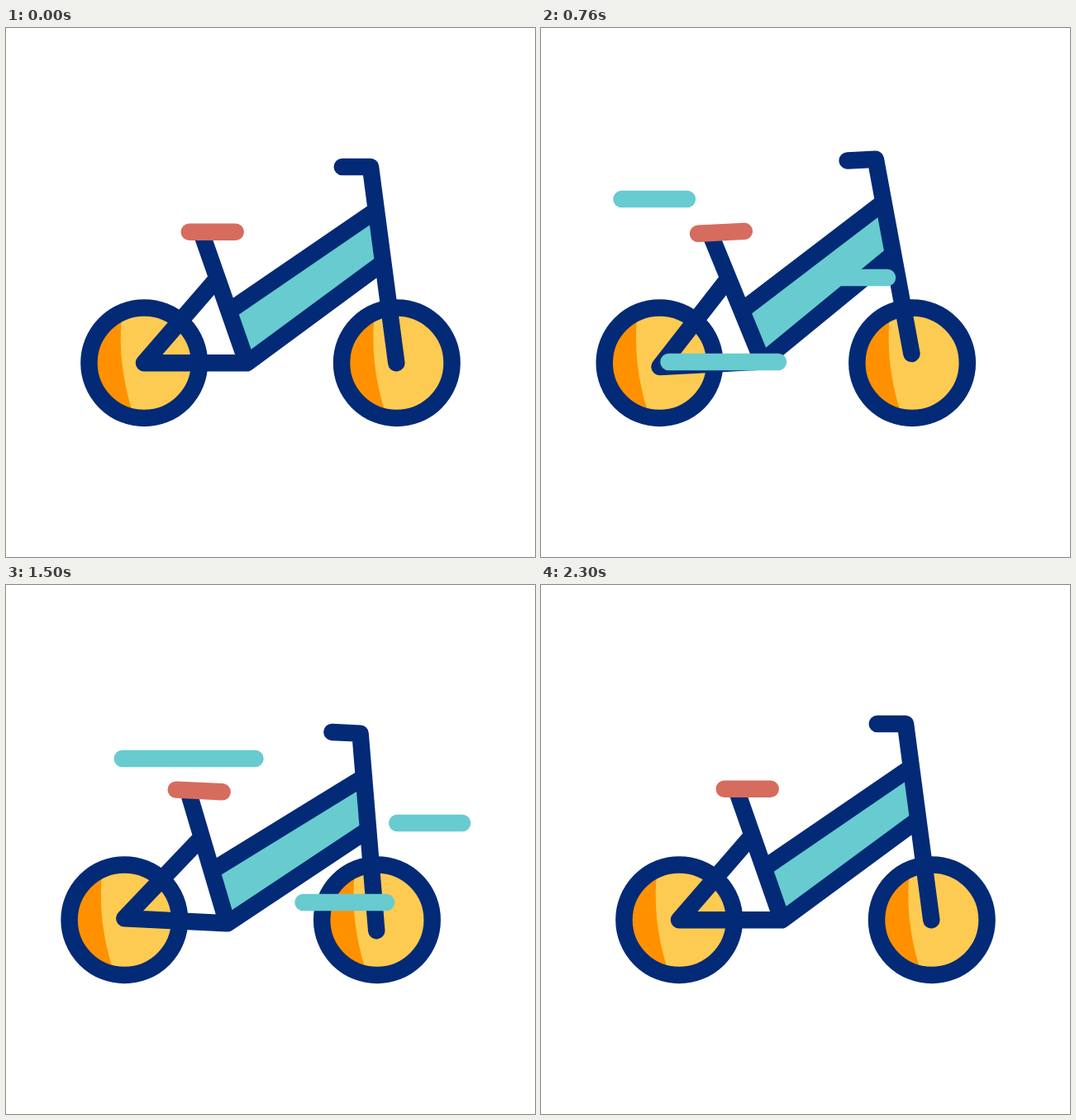
An HTML page for the animation above (2.42 s loop, 640 by 640 pixels).

```html
<!DOCTYPE html>
<html lang="en">
<head>
<meta charset="utf-8">
<title>Bicycle</title>
<style>
  html, body { margin: 0; width: 100%; height: 100%; overflow: hidden; background: #fff; }
  svg { display: block; width: 100%; height: 100%; }
  .line { fill: none; stroke-width: 20.5; stroke-linecap: round; stroke-linejoin: round; }
  .navy { stroke: #032a76; }
  .red { stroke: #d66c5e; }
  .teal { stroke: #67cbd0; }
</style>
</head>
<body>
<svg viewBox="0 0 640 640">
  <defs>
    <g id="wheel">
      <circle r="62" fill="#fdcb51"/>
      <path d="M-27.1-58Q-32.9 0-14.6 58A60 60 0 0 1-27.1-58Z" fill="#ff9100"/>
      <circle class="line navy" r="66.75"/>
    </g>
  </defs>
  <g id="wheels">
    <use href="#wheel" x="167.2" y="405.2"/>
    <use href="#wheel" x="472.8" y="405.2"/>
  </g>
  <g id="frame">
    <path d="M269 343L448 220.5L456 284L291.5 405Z" fill="#67cbd0"/>
    <path class="line navy" d="M236.5 248L291.5 405.3H167L255.5 303M273 340.3L448 220.5M291.5 405.3L456 284M406.8 168H441L472.3 405.3"/>
    <path class="line red" d="M221.8 246.8H277.7"/>
  </g>
  <g id="wind"></g>
</svg>
<script>
const LOOP = 2420, END = 2300, STEP = 20;
const HEAD = 440, TAIL = 380, DELAY = 292, LENGTH = 199.5;

const byId = id => document.getElementById(id);
const wheels = byId('wheels'), frame = byId('frame'), wind = byId('wind');

const ease = x => {
  x = Math.min(1, Math.max(0, x));
  return x * x * (3 - 2 * x);
};

// Swings from rest through a few [time, value] turning points
const swing = (...turns) => t => {
  let time = 0, last = 0, sum = 0;
  for (const [next, value] of turns) {
    sum += (value - last) * ease((t - time) / (next - time));
    [time, last] = [next, value];
  }
  return sum;
};

const shift = swing([580, -45], [1100, 32], [1655, -37], [2110, 0]);
const tilt = swing([690, -3.1], [1500, 2.8], [END, 0]);
const bounce = swing([470, 10.4], [1020, -15], [1345, 9], [1900, -9.7], [END, 0]);

// A streak grows leftwards from its right end, then its tail catches up
function gust(start, right, y) {
  const path = document.createElementNS('http://www.w3.org/2000/svg', 'path');
  path.setAttribute('class', 'line teal');
  wind.append(path);
  return t => {
    const age = t - start;
    const head = right - LENGTH * ease(age / HEAD);
    const tail = right - LENGTH * ease((age - DELAY) / TAIL);
    const visible = age > 0 && age < DELAY + TAIL;
    path.setAttribute('d', visible ? `M${head} ${y}H${tail + 0.01}` : '');
  };
}

const gusts = [
  gust(252, 297, 207), gust(491, 287, 404), gust(580, 419, 302),
  gust(1019, 559, 384), gust(1114, 332, 210), gust(1311, 552, 288)
];

function draw(t) {
  const x = shift(t);
  wheels.setAttribute('transform', `translate(${x} 0)`);
  frame.setAttribute('transform',
    `translate(${x} ${bounce(t)}) rotate(${tilt(t)} 320 405)`);
  gusts.forEach(move => move(t));
}

const origin = performance.now();
function tick() {
  const t = (performance.now() - origin) % LOOP;
  draw(Math.min(END, Math.floor(t / STEP) * STEP));
  requestAnimationFrame(tick);
}
tick();
</script>
</body>
</html>
```
